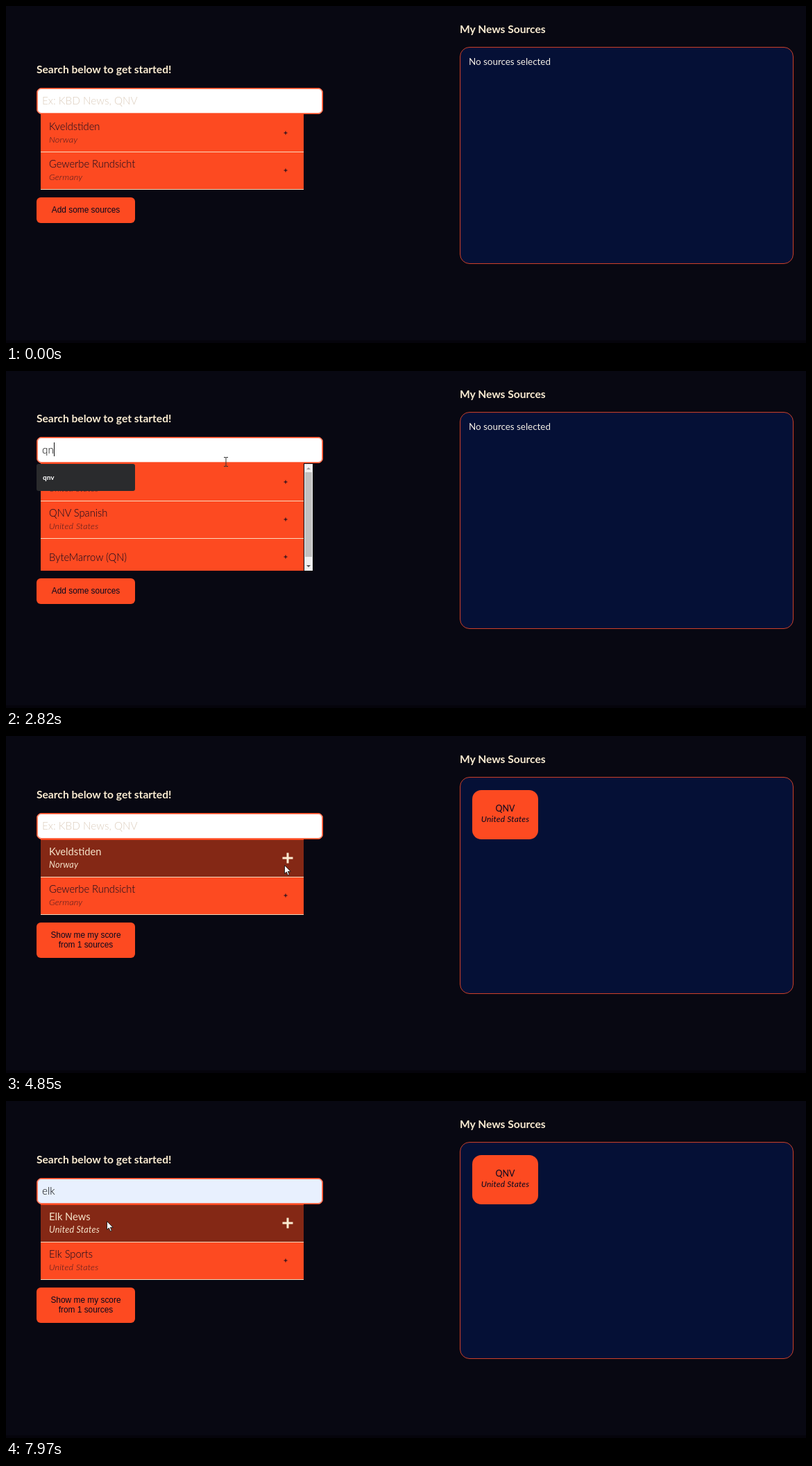
Animation of 1153 by 486 pixels, one loop 8 s. Source, as an HTML page:

```html
<!DOCTYPE html>
<html lang="en">
<head>
<meta charset="utf-8">
<title>News source search</title>
<style>
  :root { --orange: #fd4a21; --cream: #fbecd2; --navy: #08081f; }
  * { box-sizing: border-box; }
  html, body { margin: 0; width: 100%; height: 100%; overflow: hidden; background: #080812; }
  body { position: relative; font-family: Lato, "Open Sans", sans-serif; }
  body div, body svg { position: absolute; }
  .floor { left: 0; right: 0; top: 482px; height: 4px; background: #05040b; }
  .title { color: var(--cream); font: 700 15.6px/20px Lato, sans-serif; white-space: nowrap; }
  #form { left: 0; top: 0; }
  .input { left: 44px; top: 118px; width: 413px; height: 38px; padding: 0 0 2px 7px; z-index: 2;
    display: flex; align-items: center; background: #fff; border: 1px solid var(--orange);
    box-shadow: inset 0 0 0 1px rgba(253, 74, 33, .65); border-radius: 7px;
    color: #000; font-size: 15.3px; font-weight: 300; white-space: pre; }
  .input.filled { background: #e8f0fe; }
  .input .hint { color: #dccdbd; }
  .input .preview { font-size: 10px; font-weight: 400; color: #111; }
  .caret { width: 1px; height: 20px; background: #111; }
  .list { left: 50px; top: 155px; width: 392px; overflow: hidden; }
  .list::before { content: ""; position: absolute; width: 379px; height: 2px; background: var(--orange); }
  .row { left: 0; width: 379px; height: 54px; padding: 0 0 2px 12px; display: flex;
    flex-direction: column; justify-content: center; background: var(--orange);
    border-bottom: 1px solid #fbd9bd; color: var(--navy); line-height: 20px; white-space: nowrap; }
  .row b { font-size: 14.7px; font-weight: 300; }
  .row i, .card i { font-size: 12.6px; font-weight: 300; letter-spacing: .2px; }
  .row i { opacity: .75; }
  .plus { --size: 5px; --line: 1px; left: 352.5px; top: 25.5px; width: var(--size); height: var(--size);
    transform: translate(-50%, -50%); }
  .plus::before, .plus::after { content: ""; position: absolute; background: currentColor; }
  .plus::before { left: 0; width: 100%; top: calc((var(--size) - var(--line)) / 2); height: var(--line); }
  .plus::after { top: 0; height: 100%; left: calc((var(--size) - var(--line)) / 2); width: var(--line); }
  .row.over { background: #842815; color: var(--cream); }
  .row.over b, .row.over i { font-weight: 400; opacity: .95; }
  .row.over .plus { --size: 15px; --line: 3px; left: 355.5px; }
  .bar { left: 380px; top: 2px; width: 12px; height: 154px; background: #f1f1f1; }
  .bar div { left: 1px; width: 10px; top: 12px; background: #c1c1c1; }
  .bar::before, .bar::after { content: ""; position: absolute; left: 3px; border: 3px solid transparent; }
  .bar::before { top: 2px; border-bottom-color: #a3a3a3; }
  .bar::after { bottom: 2px; border-top-color: #505050; }
  .button { left: 44px; width: 142px; border-radius: 6px; background: var(--orange); color: var(--navy);
    display: flex; align-items: center; justify-content: center; text-align: center;
    font: 11.9px/13.5px "Liberation Sans", Arial, sans-serif; white-space: pre; }
  .tips { left: 44px; top: 157px; width: 142px; padding: 6px 0; z-index: 3; border-radius: 3px;
    background: #2a2b2d; color: #fff; font-size: 10px; font-weight: 700; }
  .tips p { margin: 0; padding-left: 9px; height: 26.6px; line-height: 26.6px; }
  .tips.lit p { background: #4b4c4f; }
  .panel { left: 653.5px; top: 59px; width: 481px; height: 313px; border: 1px solid #cc4029;
    border-radius: 14px; background: #051036; }
  .empty { left: 667px; top: 70px; color: #f4efe6; font-size: 13.4px; line-height: 20px; white-space: nowrap; }
  .card { left: 672px; top: 78px; width: 95px; height: 71px; padding-top: 19px; border-radius: 13px;
    background: var(--orange); color: var(--navy); text-align: center; font-size: 12.4px;
    line-height: 15px; white-space: nowrap; }
  .card i { display: block; margin: 0 -5px; font-weight: 400; font-size: 12px; }
  #ring { left: 0; top: 0; width: 22px; height: 22px; margin: -11px; border-radius: 50%;
    background: rgba(180, 178, 12, .82); z-index: 4; }
  #arrow, #beam { left: 0; top: 0; overflow: visible; z-index: 5; }
</style>
</head>
<body>
<div class="floor"></div>
<div class="title" style="left:654px;top:23px">My News Sources</div>
<div class="panel"></div>
<div class="empty" id="empty">No sources selected</div>
<div class="card" id="card">QNV<i>United States</i></div>
<div id="form"></div>
<div id="ring"></div>
<svg id="arrow" width="10" height="16"><path d="M.5 .5V12.6L3.3 10L5.3 14.8L7.3 14L5.3 9.3H9.2Z" fill="#fff" stroke="#1a1a1a" stroke-width=".9"/></svg>
<svg id="beam" width="8" height="14"><path d="M-3 -6.5H-.8L0 -6L.8 -6.5H3M0 -6V6M-3 6.5H-.8L0 6L.8 6.5H3" fill="none" stroke="#333"/></svg>
<script>
const LOOP = 8000, BLINK = 530, ROW = 54;
const US = 'United States';
const $ = id => document.getElementById(id);

const starters = [['Kveldstiden', 'Norway'], ['Gewerbe Rundsicht', 'Germany']];
const review = ['Antipodean Commerce Monthly', 'Australia'];
const network = [['QNV', US], ['QNV Spanish', US]];
const history = ['a', 'elk', 'the', 'z', 'the bla', 'the e'];

// Each state holds from its time until the next one; thumb marks a scrolling list.
const states = [
  { at: 0, y: 0, text: '', rows: starters },
  { at: 1870, y: 0, text: '', rows: starters, tips: history },
  { at: 2340, y: -23, text: 'q', tips: ['qnv'], thumb: 19,
    rows: [['KBD News', US], ['KBD News (AU)', 'Australia'], review] },
  { at: 2670, y: -23, text: 'qn', tips: ['qnv'], thumb: 122,
    rows: [...network, ['ByteMarrow (QN)', '']] },
  { at: 3060, y: 0, text: 'qnv', rows: network },
  { at: 4760, y: -7, text: '', rows: starters, added: true },
  { at: 5650, y: -7, text: '', rows: starters, tips: history, added: true },
  { at: 5970, y: -30, text: 'e', tips: ['elk'], thumb: 19, added: true,
    rows: [starters[0], review, ['Hubfrond', US]] },
  { at: 7160, y: -7, text: 'elk', filled: true, added: true,
    rows: [['Elk News', US], ['Elk Sports', US]] }
];

// Pointer path: time, x, y
const path = [
  [290, 1016, 488], [520, 860, 425], [800, 560, 345], [1070, 399, 290], [1230, 344, 212],
  [1400, 318, 140], [1520, 317, 125], [1720, 317, 131], [3100, 317, 131], [3400, 345, 165],
  [3850, 401, 186], [5080, 401, 186], [5300, 310, 160], [5560, 194, 136], [6790, 194, 136],
  [6990, 136, 137], [7180, 136, 137], [7560, 143, 166], [7760, 145, 173]
];
const clicks = [[1750, 1870], [4220, 4420], [5550, 5650], [7030, 7190]];

const slope = (i, k) => path[i] && path[i + 1]
  ? (path[i + 1][k] - path[i][k]) / (path[i + 1][0] - path[i][0]) : 0;

// Monotone tangent: rests stay still and turns never overshoot.
function tangent(i, k) {
  const a = slope(i - 1, k), b = slope(i, k);
  return a * b > 0 ? 2 * a * b / (a + b) : 0;
}

function along(t, k) {
  const last = path.length - 1;
  if (t <= path[0][0]) return path[0][k];
  if (t >= path[last][0]) return path[last][k];
  const i = path.findIndex(p => p[0] > t) - 1;
  const span = path[i + 1][0] - path[i][0], u = (t - path[i][0]) / span, v = 1 - u;
  return path[i][k] * v * v * (1 + 2 * u) + path[i + 1][k] * u * u * (3 - 2 * u)
    + span * u * v * (tangent(i, k) * v - tangent(i + 1, k) * u);
}

const show = (el, on) => { el.style.display = on ? '' : 'none'; };

function inputText(s, lit, caret) {
  if (lit) return `<span class="preview">${s.tips[0]}</span>`;
  if (!s.text) return '<span class="hint">Ex: KBD News, QNV</span>';
  return `<span>${s.text}</span>${caret ? '<span class="caret"></span>' : ''}`;
}

function formHtml(s, over, lit, caret) {
  const height = s.thumb ? 154 : 2 * ROW;
  const rows = s.rows.map(([name, land], i) =>
    `<div class="row ${i === over ? 'over' : ''}" style="top:${2 + i * ROW}px">
      <b>${name}</b>${land && `<i>${land}</i>`}<div class="plus"></div></div>`).join('');
  const bar = s.thumb ? `<div class="bar"><div style="height:${s.thumb}px"></div></div>` : '';
  const tips = s.tips
    ? `<div class="tips ${lit ? 'lit' : ''}">${s.tips.map(w => `<p>${w}</p>`).join('')}</div>` : '';
  const label = s.added ? 'Show me my score\nfrom 1 sources' : 'Add some sources';
  return `<div class="title" style="left:44px;top:81px">Search below to get started!</div>
    <div class="input ${s.filled || lit ? 'filled' : ''}">${inputText(s, lit, caret)}</div>
    <div class="list" style="height:${height + 2}px">${rows}${bar}</div>
    <div class="button" style="top:${168 + height}px;height:${s.added ? 51 : 37}px">${label}</div>${tips}`;
}

let drawn = '';

function draw(t) {
  const index = states.findLastIndex(s => s.at <= t), s = states[index];
  const x = along(t, 1), y = along(t, 2), localY = y - s.y;

  const inInput = x > 44 && x < 457 && localY > 118 && localY < 156;
  const tipsEnd = s.tips ? 169 + 26.6 * s.tips.length : 0;
  const inTips = x > 44 && x < 186 && localY > 157 && localY < tipsEnd;
  const inList = !inTips && x > 50 && x < 429 && localY >= 156;
  const over = inList ? Math.max(0, Math.floor((localY - 157) / ROW)) : -1;
  const focused = t < 4220 || t > 5550;
  const caret = focused && Math.floor((t - s.at) / BLINK) % 2 === 0;

  const key = [index, over, inTips, caret].join();
  if (key !== drawn) {
    drawn = key;
    $('form').innerHTML = formHtml(s, over, inTips, caret);
    $('form').style.top = s.y + 'px';
    show($('card'), s.added);
    show($('empty'), !s.added);
  }

  for (const id of ['arrow', 'beam', 'ring']) $(id).style.transform = `translate(${x}px, ${y}px)`;
  show($('beam'), inInput);
  show($('arrow'), !inInput);
  show($('ring'), clicks.some(([a, b]) => t >= a && t < b));
}

const start = performance.now();
function tick() {
  draw((performance.now() - start) % LOOP);
  requestAnimationFrame(tick);
}
tick();
</script>
</body>
</html>
```
